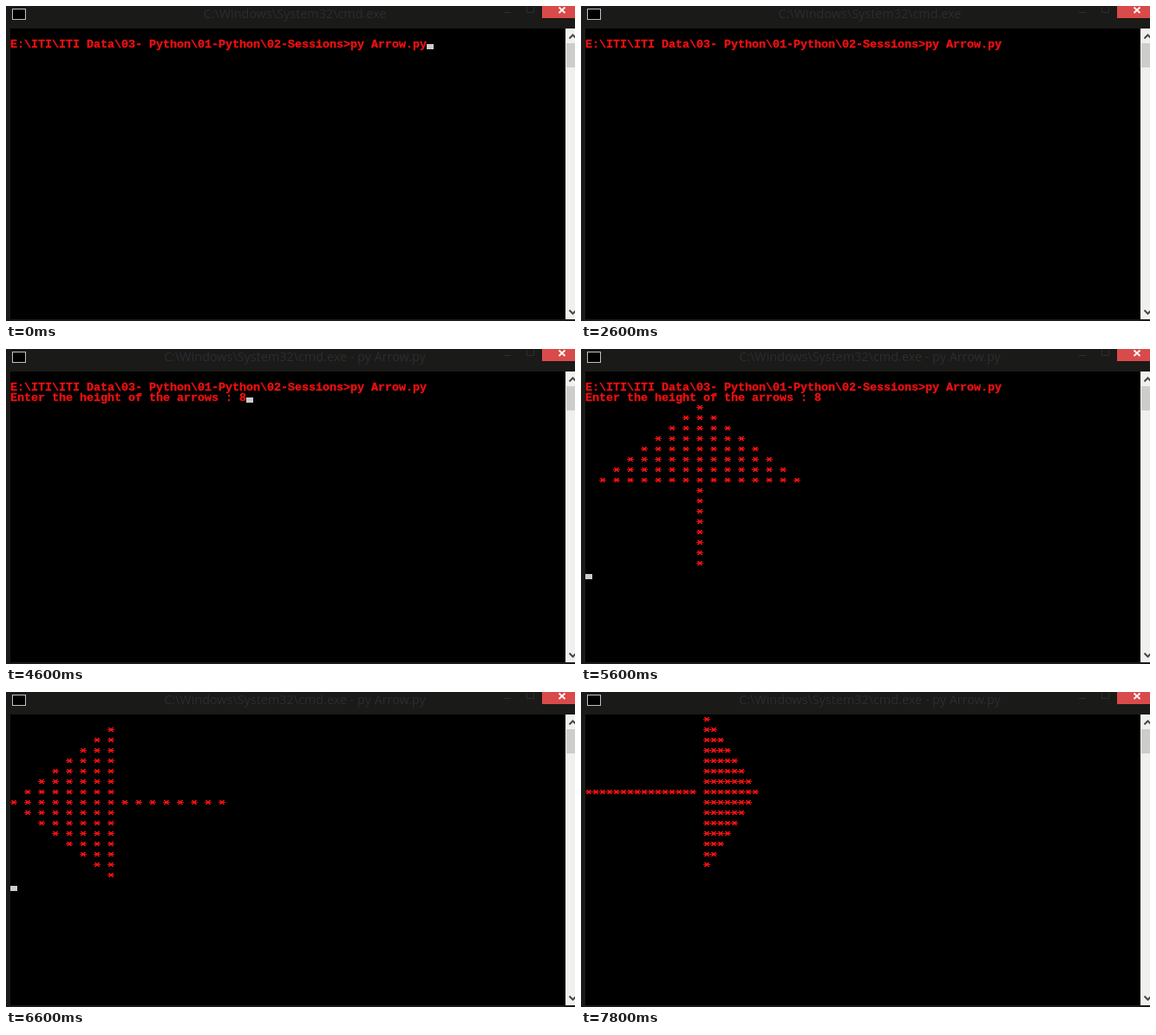
An HTML page that plays this animation: 656 px wide and 364 px high, repeating every 8 s.

```html
<!DOCTYPE html>
<html lang="en">
<head>
<meta charset="utf-8">
<title>Console arrows</title>
<style>
  html, body { margin: 0; width: 100%; height: 100%; overflow: hidden; background: #000; }
  svg { display: block; width: 656px; height: 364px; }
  .title { font: 14.4px "Open Sans", "Noto Sans", sans-serif; fill: #2c2c34; text-anchor: middle; }
  .console { fill: #ee1010; }
  .console text {
    font: bold 13.333px "Liberation Mono", "DejaVu Sans Mono", monospace;
    stroke: #ee1010; stroke-width: .35; white-space: pre;
  }
</style>
</head>
<body>
<svg viewBox="0 0 656 364">
  <rect width="656" height="364" fill="#1a1a18"/>
  <rect x="5" y="26" width="640" height="336"/>
  <rect x="7.5" y="3.5" width="15" height="12" fill="#000" stroke="#c0c0c0"/>
  <text id="title" class="title" x="333" y="14"></text>
  <path d="M574 7.5h8M600.5 1v6.5h8V1" fill="none" stroke="#2c2c34"/>
  <rect x="618" width="38" height="14" fill="#d94a4a"/>
  <path d="M637.5 1.5l7 6.5M644.5 1.5l-7 6.5" stroke="#fff" stroke-width="1.8"/>
  <rect x="645" y="26" width="11" height="336" fill="#f0f0ee"/>
  <rect x="646" y="43" width="10" height="28" fill="#cdcdcb"/>
  <path d="M649.5 37.5l4-4 4 4M649.5 351.5l4 4 4-4" fill="none" stroke="#484848" stroke-width="2"/>
  <g class="console">
    <text id="command" x="5" y="48"></text>
    <text id="question" x="5" y="60"></text>
    <path id="stars" shape-rendering="crispEdges"/>
  </g>
  <rect id="cursor" width="8" height="6" fill="#cccccc"/>
</svg>
<script>
const LOOP = 8000, LEFT = 5, TOP = 26, CELL_W = 8, CELL_H = 12, SIZE = 8;
const el = id => document.getElementById(id);
const title = el("title"), command = el("command"), question = el("question");
const stars = el("stars"), cursor = el("cursor");

const prompt = String.raw`E:\ITI\ITI Data\03- Python\01-Python\02-Sessions>`;
const shell = String.raw`C:\Windows\System32\cmd.exe`;
const run = prompt + "py Arrow.py", clear = prompt + "cls";
const ask = "Enter the height of the arrows : ";

const range = (from, to) => Array.from({ length: to - from + 1 }, (_, i) => from + i);

// One asterisk in a character cell, built from pixel rows
function star(col, row) {
  const x = LEFT + col * CELL_W, y = TOP + row * CELL_H + 3;
  const bar = (dx, dy, w) => `M${x + dx} ${y + dy}h${w}v1h${-w}z`;
  return bar(1, 0, 2) + bar(5, 0, 2) + bar(2, 1, 4) + bar(0, 2, 8) +
         bar(2, 3, 4) + bar(1, 4, 2) + bar(5, 4, 2);
}

const line = (row, from, to, step = 1) =>
  range(from, to).map(i => star(i * step, row)).join("");

const vertical = (headRow, headSpread, stemRow) =>
  range(0, SIZE - 1).map(i =>
    line(headRow + i, SIZE - headSpread(i), SIZE + headSpread(i), 2) +
    line(stemRow + i, SIZE, SIZE, 2)).join("");

const horizontal = drawRow =>
  range(0, 2 * SIZE - 2).map(i => drawRow(i, Math.abs(SIZE - 1 - i))).join("");

const up = vertical(3, i => i, 11);
const down = vertical(8, i => SIZE - 1 - i, 0);
const left = horizontal((i, d) => line(i + 1, d, d ? 7 : 15, 2));
const right = horizontal((i, d) => line(i, 17, 24 - d) + (d ? "" : line(i, 0, 15)));

// start time, command, question, arrow, cursor cell [column, row]
const scenes = [
  [0, run, "", "", [run.length, 1]],
  [200, run, "", ""],
  [800, clear, "", "", [clear.length, 1]],
  [2600, run, "", ""],
  [3000, run, ask, ""],
  [3400, run, ask, "", [ask.length, 2]],
  [4000, run, ask, ""],
  [4400, run, ask + "8", "", [ask.length + 1, 2]],
  [4800, run, ask + "8", up],
  [5400, run, ask + "8", up, [0, 19]],
  [5800, "", "", left],
  [6600, "", "", left, [0, 16]],
  [6800, "", "", down],
  [7600, "", "", down, [0, 16]],
  [7800, "", "", right]
];

let current;
function render(time) {
  const scene = scenes.findLast(s => s[0] <= time);
  if (scene === current) return;
  current = scene;
  const [start, typed, asked, arrow, cell] = scene;
  title.textContent = start >= 3000 ? shell + " - py Arrow.py" : shell;
  command.textContent = typed;
  question.textContent = asked;
  stars.setAttribute("d", arrow);
  cursor.setAttribute("visibility", cell ? "visible" : "hidden");
  if (cell) {
    cursor.setAttribute("x", LEFT + cell[0] * CELL_W);
    cursor.setAttribute("y", TOP + cell[1] * CELL_H + 6);
  }
}

const began = performance.now();
function tick() {
  render((performance.now() - began) % LOOP);
  requestAnimationFrame(tick);
}
tick();
</script>
</body>
</html>
```
